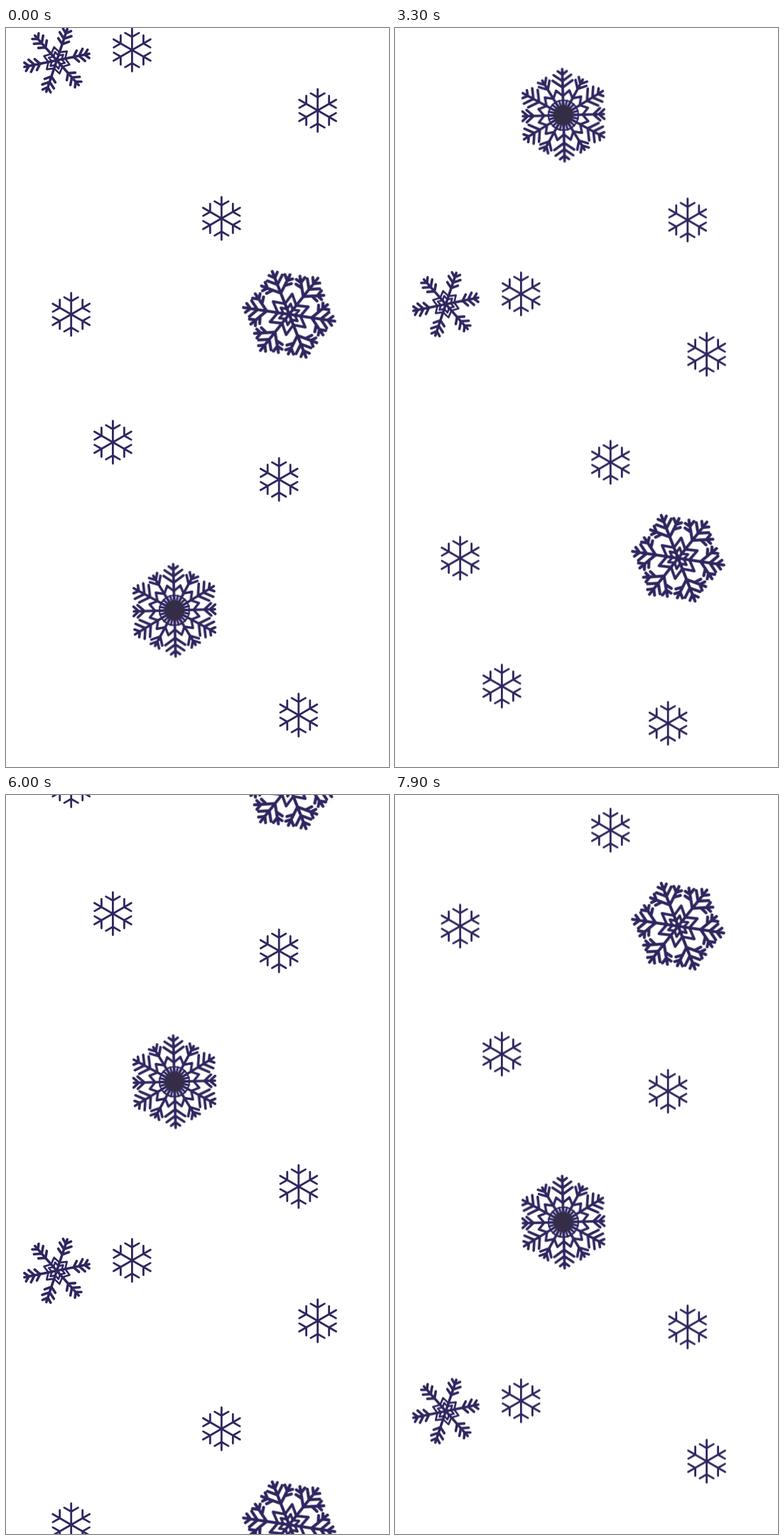
An HTML page for the animation above (8000 ms loop, 539 px wide and 1040 px high).

```html
<!DOCTYPE html>
<html lang="en">
<head>
<meta charset="utf-8">
<title>Falling snowflakes</title>
<style>
  html, body { margin: 0; width: 100%; height: 100%; overflow: hidden; background: #fff; }
  svg { display: block; width: 539px; height: 1040px; }
  #snow {
    fill: none; stroke: #2f2660; stroke-linecap: round; stroke-linejoin: round;
    animation: fall 8s steps(80, end) infinite;
  }
  @keyframes fall { to { transform: translateY(832px); } }
</style>
</head>
<body>
<svg viewBox="0 0 539 1040">
  <defs id="defs"></defs>
  <g id="snow"></g>
</svg>
<script>
  const TILE = 1040;

  // Polar point: angle in degrees clockwise from straight up.
  const polar = (r, deg) => {
    const a = deg * Math.PI / 180;
    return [r * Math.sin(a), -r * Math.cos(a)];
  };
  const pt = ([x, y]) => x.toFixed(2) + ' ' + y.toFixed(2);
  const stem = (from, to) => `M0 ${-from}V${-to}`;

  // A pair of side branches growing from the stem at radius r.
  const twig = (r, len, deg) => {
    const [x, y] = polar(len, deg);
    return `M${pt([-x, y - r])}L0 ${-r}L${pt([x, y - r])}`;
  };

  // Small shoots on both branches of a twig, at distance s along them.
  const shoots = (r, deg, s, len, turn) => {
    const [x, y] = polar(s, deg), [dx, dy] = polar(len, turn);
    return [-1, 1].map(m =>
      `M${pt([m * x, y - r])}L${pt([m * (x + dx), y - r + dy])}`).join('');
  };

  const star = (n, rArm, rGap) => 'M' + Array.from({ length: 2 * n }, (_, i) =>
    pt(polar(i % 2 ? rGap : rArm, i * 180 / n))).join('L') + 'Z';

  const path = (d, width, turn = 0) =>
    `<path d="${d}" stroke-width="${width}" transform="rotate(${turn})"/>`;
  const spin = (n, d, width, start = 0) =>
    Array.from({ length: n }, (_, i) => path(d, width, start + i * 360 / n)).join('');
  const flake = (id, tilt, body) => `<g id="${id}"><g transform="rotate(${tilt})">${body}</g></g>`;

  const plain = spin(6, stem(0, 30) + twig(18.5, 11.3, 60), 2.8);

  const spiky = spin(6, stem(0, 46.5) + twig(24, 10, 52) + twig(32, 11, 52) + twig(40, 8, 48), 3.6)
    + path(star(6, 12, 19), 2.6) + path(star(6, 7, 12), 2.6);

  const fern = spin(6, stem(0, 65) + twig(55, 9, 45) + twig(45, 15, 48) + twig(32, 29, 48)
    + shoots(32, 48, 12, 10, 95) + shoots(32, 48, 20, 9, 0) + shoots(32, 48, 20, 8, 95), 4.2)
    + path(star(6, 16, 29), 3.8) + path(star(6, 8, 15), 3.4);

  const lace = spin(6, stem(0, 65) + twig(57, 8, 52) + twig(48, 15, 55) + twig(39, 17, 55), 3.6)
    + spin(6, stem(0, 57) + twig(50, 10, 42) + twig(42, 13, 42), 3.6, 30)
    + path(star(12, 27, 36), 3.4)
    + spin(24, stem(0, 21), 3)
    + '<circle r="21" stroke-width="2.2"/><circle r="14" fill="#352d48" stroke="none"/>';

  document.getElementById('defs').innerHTML =
    flake('plain', 0, plain) + flake('spiky', 18.5, spiky) +
    flake('fern', -21.5, fern) + flake('lace', -1.5, lace);

  const sky = [
    ['spiky', 71.5, 45.5], ['plain', 177.4, 31], ['plain', 438.6, 116],
    ['plain', 303.3, 268], ['fern', 398.5, 403], ['plain', 91.7, 403],
    ['plain', 150.4, 583], ['plain', 384.2, 635.3], ['lace', 237, 819.5],
    ['plain', 411.8, 967]
  ];
  document.getElementById('snow').innerHTML = [0, -TILE].map(dy =>
    sky.map(([id, x, y]) => `<use href="#${id}" x="${x}" y="${y + dy}"/>`).join('')).join('');
</script>
</body>
</html>
```
